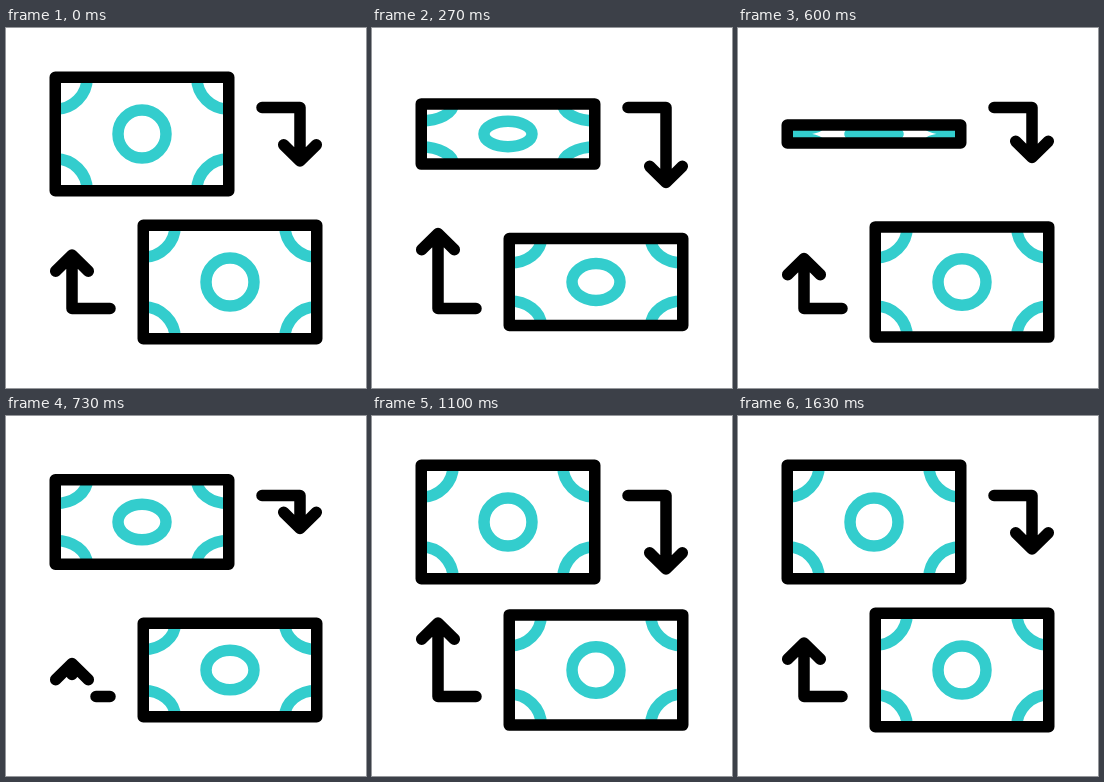
Recreate the animation shown at these times as an HTML page. Size 360 by 360 pixels, loop 2 s.

```html
<!DOCTYPE html>
<html lang="en">
<head>
<meta charset="utf-8">
<title>Money exchange</title>
<style>
  html, body { margin: 0; width: 100%; height: 100%; overflow: hidden; background: #fff; }
  svg { display: block; width: 100vw; height: 100vh; }
  .ink, .teal { fill: none; stroke-width: 11.5; stroke-linecap: round; stroke-linejoin: round; }
  .ink { stroke: #000; }
  .teal { stroke: #33cdcd; }
</style>
</head>
<body>
<svg id="stage" viewBox="0 0 360 360"></svg>
<script>
const LOOP = 2000, FPS = 30, LAST_STEP = 49;
const HALF_W = 86.75, HALF_H = 56.75;
const stage = document.getElementById('stage');

function add(parent, tag, attrs = {}) {
  const node = document.createElementNS('http://www.w3.org/2000/svg', tag);
  parent.appendChild(node);
  return set(node, attrs);
}

function set(node, attrs) {
  for (const key in attrs) node.setAttribute(key, attrs[key]);
  return node;
}

// Linear interpolation through [step, value] pairs, clamped at both ends.
function track(keys, n) {
  if (n <= keys[0][0]) return keys[0][1];
  for (let i = 1; i < keys.length; i++) {
    const [a, from] = keys[i - 1], [b, to] = keys[i];
    if (n <= b) return from + (to - from) * (n - a) / (b - a);
  }
  return keys[keys.length - 1][1];
}

// A banknote turning about its horizontal axis with constant line weight.
function makeBill(id, cx, cy, turn) {
  const group = add(stage, 'g', { transform: `translate(${cx} ${cy})` });
  const clip = add(add(group, 'clipPath', { id }), 'rect');
  const art = add(group, 'g', { class: 'teal', 'clip-path': `url(#${id})` });
  const coin = add(art, 'ellipse', { rx: 24 });
  const corners = [[-1, -1], [1, -1], [-1, 1], [1, 1]].map(([sx, sy]) => ({
    sy, node: add(art, 'ellipse', { cx: sx * HALF_W, rx: 32 })
  }));
  const frame = add(group, 'rect', { class: 'ink' });

  return n => {
    const scale = Math.abs(Math.cos(track(turn, n) * Math.PI / 180));
    const h = Math.max(HALF_H * scale, 0.5);
    const box = { x: -HALF_W, y: -h, width: 2 * HALF_W, height: 2 * h };
    set(clip, box);
    set(frame, box);
    set(coin, { ry: Math.max(24 * scale, 0.2) });
    for (const { sy, node } of corners)
      set(node, { cy: sy * h, ry: Math.max(32 * scale, 0.2) });
  };
}

function makeArrow(transform, reach, gap) {
  const path = add(stage, 'path', { class: 'ink', transform });
  return n => {
    const tip = 79.5 + track(reach, n);
    const broken = gap && n >= gap[0] && n <= gap[1];
    const shaft = broken ? `M256 79.5H270M294 ${tip - 11}V${tip}` : `M256 79.5H294V${tip}`;
    set(path, { d: `${shaft}M277.7 ${tip - 16.2}L294 ${tip}L310.3 ${tip - 16.2}` });
  };
}

const reach = peak => [
  [0, 53.5], [4, 66], [8, 75], [11, 77.5], [14, peak], [18, 50], [20, 30],
  [22, 33], [26, 52], [33, 73.5], [37, 77.5], [43, 69], [49, 53.5]
];

const parts = [
  makeBill('upper', 136, 106, [[0, 0], [8, 122], [14, 204], [22, 318], [25, 360]]),
  makeBill('lower', 224, 254,
    [[4.7, 0], [8, 40], [14, 118], [22, 214.5], [26, 263.7], [33, 346], [34.5, 360]]),
  makeArrow('', reach(75)),
  makeArrow('rotate(180 180 180)', reach(77.5), [21, 22])
];

const start = performance.now();
function draw(now) {
  const t = Math.max(0, now - start) % LOOP;
  const step = Math.min(LAST_STEP, Math.floor((t + 3.4) * FPS / 1000));
  parts.forEach(update => update(step));
  requestAnimationFrame(draw);
}
draw(start);
</script>
</body>
</html>
```
